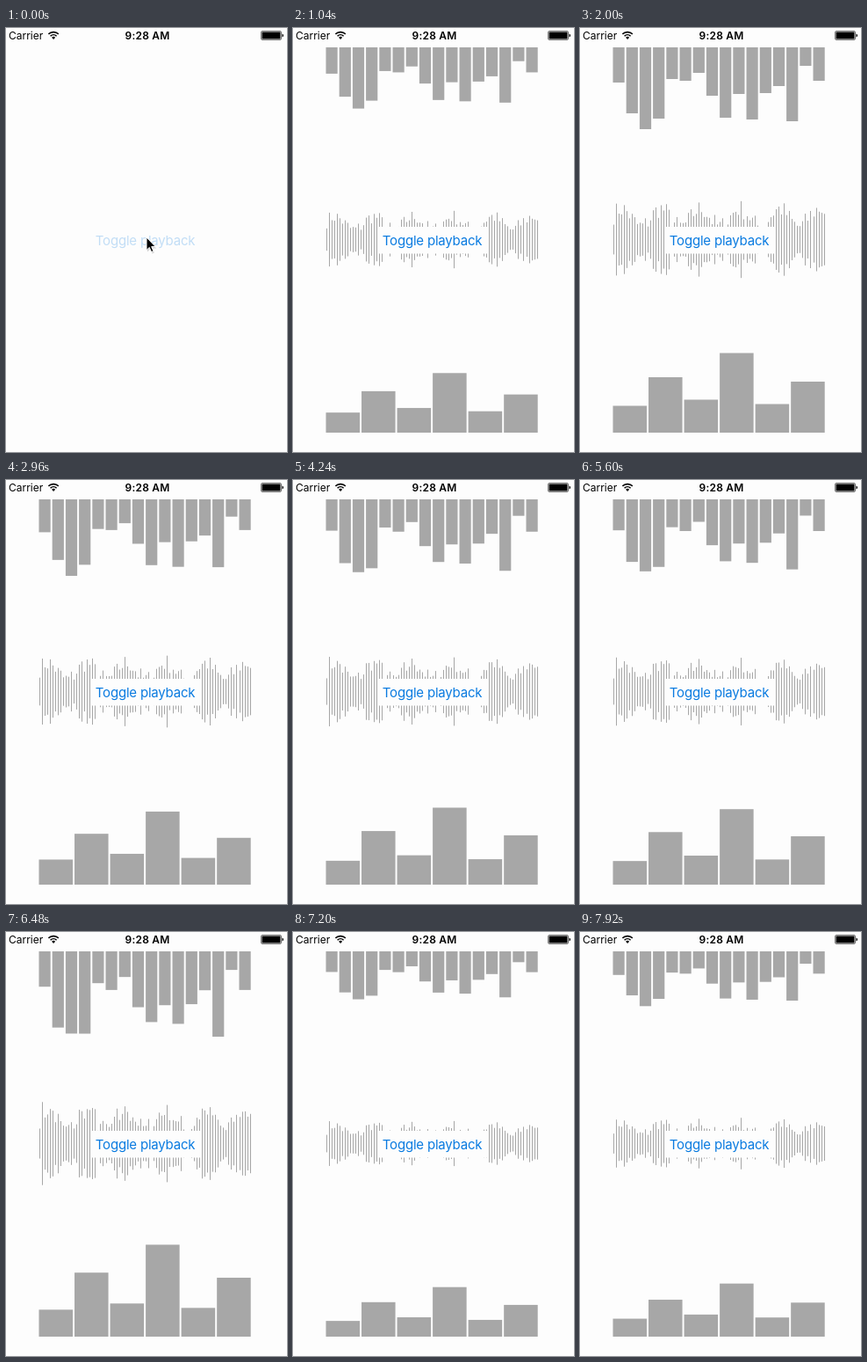
Animation, 320 px wide and 482 px high, one loop 8 s. Source, as an HTML page:

```html
<!DOCTYPE html>
<html lang="en">
<head>
<meta charset="utf-8">
<title>Audio levels</title>
<style>
  html, body { margin: 0; width: 100%; height: 100%; overflow: hidden; background: #fdfdfd; }
  svg { display: block; width: 320px; height: 482px; }
  text { font-family: Inter, Roboto, sans-serif; font-size: 12px; }
  #time { font-weight: 600; letter-spacing: .2px; }
  #label { font-size: 15px; letter-spacing: -.2px; fill: #0a7be0; }
  #bars { fill: #a7a7a7; }
</style>
</head>
<body>
<svg viewBox="0 0 320 482">
  <rect width="320" height="482" fill="#fdfdfd"/>
  <text x="3" y="13">Carrier</text>
  <g fill="none" stroke="#000" stroke-width="1.6">
    <path d="M48.4 6.9a8.2 8.2 0 0 1 11.4 0M50.6 9.2a5 5 0 0 1 7 0"/>
    <path d="M54.1 12.9l-2-2.1a2.9 2.9 0 0 1 4 0z" fill="#000" stroke="none"/>
  </g>
  <text id="time" x="161" y="13" text-anchor="middle">9:28 AM</text>
  <rect x="290.5" y="3.5" width="23" height="10" rx="1.5" fill="none" stroke="#777"/>
  <rect x="291.5" y="4.5" width="21" height="8"/>
  <path d="M314.500 6.500q1.500.5 1.500 2t-1.500 2z"/>
  <g id="bars"></g>
  <rect x="97" y="226" width="125.5" height="30.5" fill="#fdfdfd"/>
  <text id="label" x="158.6" y="246.700" text-anchor="middle">Toggle playback</text>
  <g id="cursor">
    <path d="M1 2V16.500L4.300 13.400 6.600 18.600 8.900 17.600 6.700 12.600H11.200Z" opacity=".16"/>
    <path d="M0 0V14.500L3.300 11.400 5.600 16.600 7.900 15.600 5.700 10.600H10.200Z" stroke="#fff"/>
  </g>
</svg>
<script>
const LOOP = 8000, STEP = 80, LEFT = 37.5, WIDTH = 241.2, GAP = 2;

// Bar sizes at level 1
const hanging = [40, 75, 93, 81, 36, 38, 29, 55, 80, 53, 82, 52, 44, 84, 21, 38];
const standing = [30.5, 63, 37.5, 90.5, 32.5, 58];

// The waveform: slow swells with seeded jitter
let seed = 7;
const random = () => (seed = seed * 16807 % 2147483647) / 2147483647;
const wave = Array.from({ length: 80 }, (_, i) =>
  25 + 10 * Math.cos(2 * Math.PI * (i - 3) / 14.8) + 22 * (random() - .5));

// Peaks: time, first channel, second channel. Levels dip between them.
const peaks = [
  [0, 0, 0], [480, .9, .9], [2000, 1, 1], [2960, .935, .918],
  [4240, .89, .967], [5600, .88, .948], [6480, 1.005, 1.155], [7920, .67, .667]
];
const DIP = .25;

const $ = id => document.getElementById(id);
const clamp = v => Math.max(0, Math.min(1, v));

// Even bars follow the first channel, odd bars the second.
function makeRow(sizes, place, snap) {
  const width = (WIDTH - GAP * (sizes.length - 1)) / sizes.length;
  return sizes.map((size, i) => {
    const el = document.createElementNS("http://www.w3.org/2000/svg", "rect");
    const x = LEFT + i * (width + GAP);
    el.setAttribute("x", snap ? Math.round(x) : x);
    el.setAttribute("width", snap ? 1 : width);
    $("bars").append(el);
    return { el, size, place, channel: i % 2 };
  });
}

const bars = [
  ...makeRow(hanging, h => [22, h]),
  ...makeRow(wave, h => [240.5 - h, 2 * h], true),
  ...makeRow(standing, h => [460 - h, h])
];

function levelAt(t) {
  const n = peaks.findIndex(k => k[0] > t);
  if (n < 0) return peaks[peaks.length - 1].slice(1);
  const a = peaks[n - 1], b = peaks[n];
  const p = (t - a[0]) / (b[0] - a[0]);
  const dip = DIP * Math.sin(Math.PI * p) ** 2;
  return [1, 2].map(c => a[c] * (1 - dip) + (b[c] - a[c]) * p);
}

function draw(t) {
  const level = levelAt(t);
  for (const { el, size, place, channel } of bars) {
    const [y, height] = place(size * level[channel]);
    el.setAttribute("y", y);
    el.setAttribute("height", height);
  }
  $("label").setAttribute("opacity", .24 + .76 * clamp((t - 80) / 320));
  const run = Math.max(0, t - 240) ** 2;
  $("cursor").setAttribute("transform", `translate(${160 + run * .00222} ${238 + run * .0002})`);
  $("cursor").setAttribute("visibility", t < 560 ? "visible" : "hidden");
}

const start = performance.now();
function tick(now) {
  const t = Math.max(0, now - start) % LOOP;
  draw(Math.floor(t / STEP) * STEP);
  requestAnimationFrame(tick);
}
draw(0);
requestAnimationFrame(tick);
</script>
</body>
</html>
```
